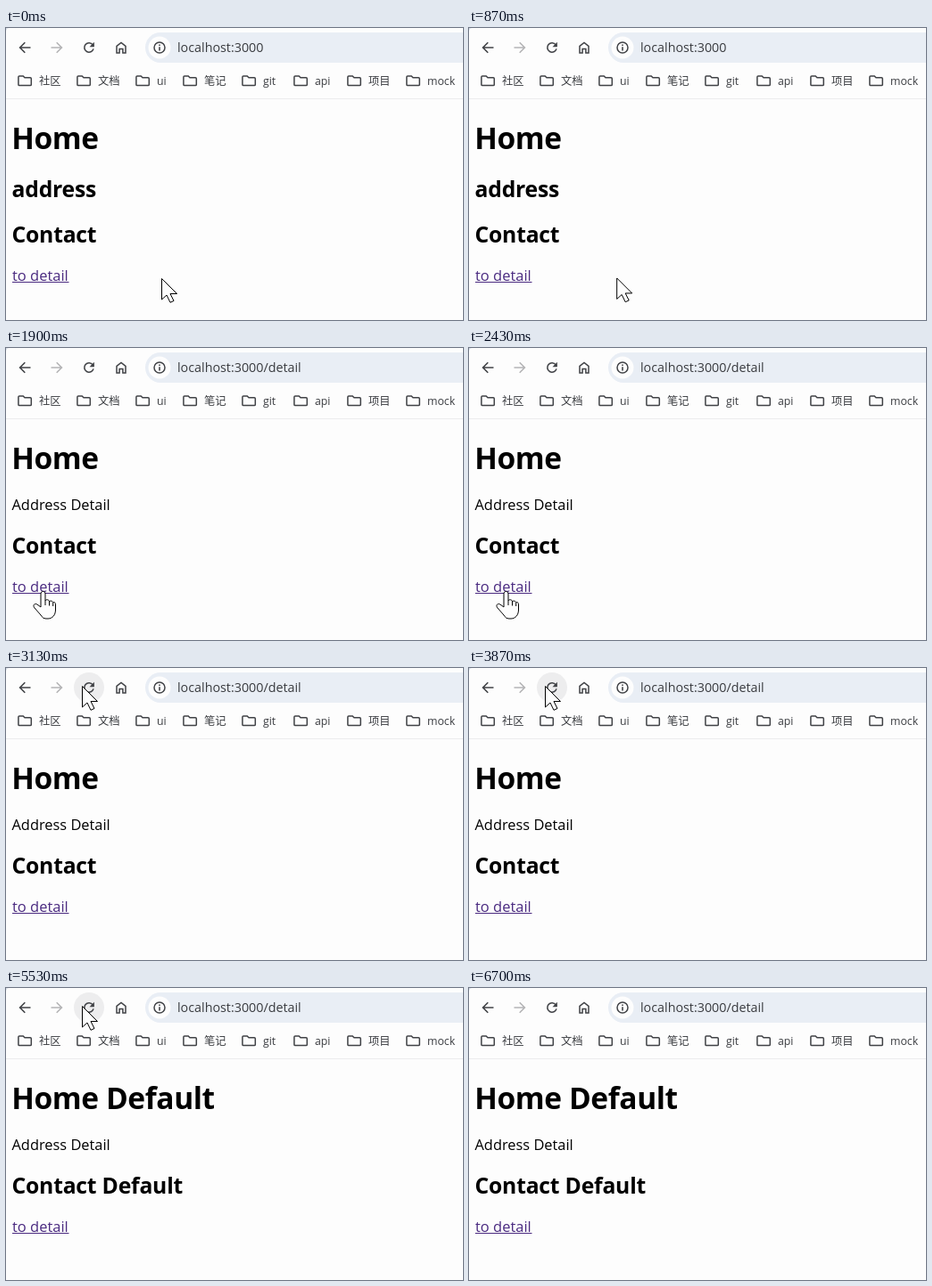
Write an HTML page that moves like this. It is 512 px wide and 328 px high and loops after 6730 ms.

```html
<!DOCTYPE html>
<html lang="en">
<head>
<meta charset="utf-8">
<title>Route reload</title>
<style>
html, body { margin: 0; width: 100%; height: 100%; overflow: hidden; background: #fdfdfd; }
svg { display: block; width: 512px; height: 328px; }
text { font-family: "Open Sans", "Noto Sans", sans-serif; fill: #000; white-space: pre; }
.h1 { font-size: 33.5px; font-weight: 700; letter-spacing: -.4px; }
.h2 { font-size: 24.7px; font-weight: 700; letter-spacing: -.2px; }
.body { font-size: 16.4px; }
.link { font-size: 16.5px; fill: #4a2a80; }
.url { font-size: 14.3px; fill: #3a3c40; }
.mark { font: 12.3px "Open Sans", "Noto Sans CJK SC", "Noto Sans CJK", "Noto Sans CJK JP", sans-serif; fill: #3a3c40; }
.icon { fill: none; stroke: #404246; stroke-width: 1.6; }
.cursor { fill: #fdfdfd; stroke: #000; stroke-width: 1; stroke-linejoin: round; }
</style>
</head>
<body>
<svg viewBox="0 0 512 328">
  <rect width="512" height="328" fill="#fdfdfd"/>
  <path d="M0 0H4Q0 0 0 4Z" fill="#d3dbe6"/>
  <path d="M0 79.5H512" stroke="#ececee"/>
  <rect x="156" y="5" width="400" height="34" rx="17" fill="#e9eef5"/>
  <circle cx="172" cy="22" r="12.5" fill="#fdfdfd"/>
  <circle id="hover" cx="93" cy="22" r="17"/>

  <g class="icon">
    <path d="M27.5 22H15.8M21.3 16.3 15.6 22l5.7 5.7"/>
    <path d="M50.5 22H62.2M56.7 16.3 62.4 22l-5.7 5.7" stroke="#b4b4b6"/>
    <path d="M97.2 18.9A5.2 5.2 0 1 0 98 23.4"/>
    <path d="M98.9 15.8V21.2H93.5Z" fill="#404246" stroke="none"/>
    <path d="M124 20.3 129 16.5l5 3.8V28H130.9V23.4H127.1V28H124Z" stroke-width="1.5"/>
    <circle cx="172" cy="22" r="6" stroke-width="1.5"/>
    <path d="M172 21.2V25.4M172 18.4V20"/>
  </g>
  <text id="url" class="url" x="192" y="27"></text>
  <g id="marks"></g>

  <text id="home" class="h1" x="6.2" y="135.7"></text>
  <text id="address" x="6.5"></text>
  <text id="contact" class="h2" x="6.5" y="241"></text>
  <g id="link">
    <text class="link" x="7" y="284">to detail</text>
    <path d="M7 285.5H70.5" stroke="#4a2a80"/>
  </g>

  <path id="arrow" class="cursor" d="M.5.5V24l5.5-5 4 8.3 4-1.8-4-8H17.5Z"/>
  <g id="hand" class="cursor">
    <path d="M-3 18V3c0-3.4 5-3.4 5 0V11c.5-2 4.5-1.6 4.5 1 .8-1.6 4.2-1 4.2 1.2 .8-1.2 2.8-.6 2.8 1.6V21c0 6-3.5 10-8.5 10H3c-3 0-4.5-1.5-6-4l-7-8c-2-2.5-.8-4.5 1.2-4.5 1.2 0 2 .6 2.8 1.3Z"/>
    <path d="M2 11V16M6.5 12V16.5M10.7 13.2V17" fill="none"/>
  </g>
</svg>
<script>
const LOOP = 6730;
const OPENED = 1900, PRESSED = 4680, RELOADED = 5000;
const $ = id => document.getElementById(id);

// Pointer path: time, x, y
const path = [
  [0, 174, 281], [800, 174, 281], [1250, 42, 273], [2520, 42, 273],
  [3100, 85, 20], [5800, 85, 20], [6150, 112, -36], [LOOP, 112, -36]
];

const bookmarks = [
  [13, "社区"], [79, "文档"], [145, "ui"], [198, "笔记"],
  [264, "git"], [322, "api"], [382, "项目"], [448, "mock"]
];
$("marks").innerHTML = bookmarks.map(([x, name]) =>
  `<path class="icon" style="stroke-width:1.5" transform="translate(${x} 53)"
    d="M2 1H6.2L8 2.8H14.2Q15.3 2.8 15.3 4V10.5Q15.3 11.6 14.2 11.6H2Q.9 11.6 .9 10.5V2Q.9 1 2 1Z"/>
   <text class="mark" x="${x + 24}" y="63.6">${name}</text>`).join("");

const ease = p => p * p * (3 - 2 * p);

function pointerAt(t) {
  const i = path.findIndex(step => step[0] > t);
  const [t0, x0, y0] = path[i - 1], [t1, x1, y1] = path[i];
  const p = ease((t - t0) / (t1 - t0));
  return [x0 + (x1 - x0) * p, y0 + (y1 - y0) * p];
}

function setText(id, value) {
  if ($(id).textContent !== value) $(id).textContent = value;
}

function place(id, x, y, visible) {
  $(id).setAttribute("transform", `translate(${x} ${y})`);
  $(id).style.display = visible ? "" : "none";
}

function render(t) {
  const detail = t >= OPENED, reloaded = t >= RELOADED;
  const suffix = reloaded ? " Default" : "";
  const lift = detail ? -10 : 0;

  setText("url", "localhost:3000" + (detail ? "/detail" : ""));
  setText("home", "Home" + suffix);
  setText("address", detail ? "Address Detail" : "address");
  $("address").setAttribute("class", detail ? "body" : "h2");
  $("address").setAttribute("y", detail ? 182 : 190);
  setText("contact", "Contact" + suffix);
  place("contact", 0, lift, true);
  place("link", 0, lift, true);

  const [x, y] = pointerAt(t);
  const overLink = x > 7 && x < 71 && y > 266 + lift && y < 290 + lift;
  const overReload = Math.hypot(x - 93, y - 22) < 17;
  place("arrow", x, y, !overLink);
  place("hand", x, y, overLink);

  const pressed = t >= PRESSED && t < RELOADED;
  $("hover").style.display = overReload ? "" : "none";
  $("hover").setAttribute("fill", pressed ? "#dcdcde" : "#ededee");
}

const start = performance.now();
function tick() {
  render((performance.now() - start) % LOOP);
  requestAnimationFrame(tick);
}
tick();
</script>
</body>
</html>
```
